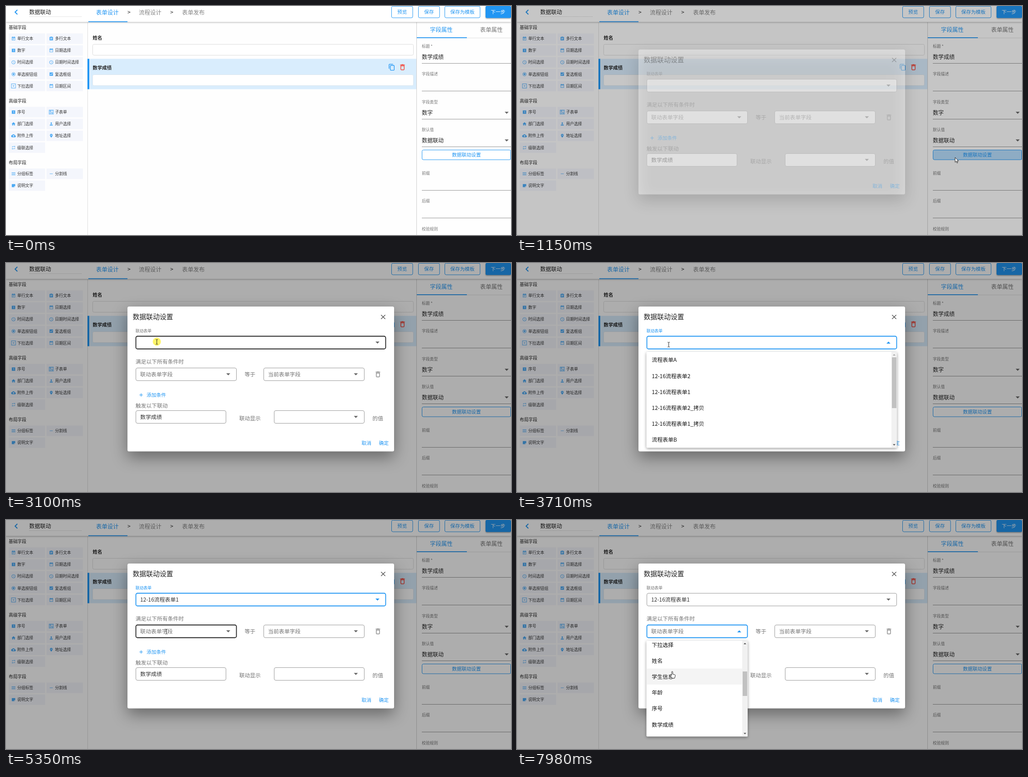
Recreate the animation shown at these times as an HTML page with a canvas. Size 1110 by 505 pixels, loop 8 s.

```html
<!DOCTYPE html>
<html lang="zh-CN">
<head>
<meta charset="utf-8">
<style>
html, body { margin: 0; width: 100%; height: 100%; overflow: hidden; background: #fff }
canvas { display: block }
</style>
</head>
<body>
<canvas id="stage" width="1110" height="505"></canvas>
<script>
const c = document.getElementById('stage').getContext('2d');
const BLUE = '#2196f3', GREY = '#757575', INK = '#222', FONT = '"Noto Sans CJK SC", "Noto Sans CJK", sans-serif';
const LOOP = 8000, ROW = 35.2;

const calendar = 'M3 3h18v18H3zM5 8h14v11H5zM6 1h2v2H6zM16 1h2v2h-2z';
const ring = 'M12 2a10 10 0 1 0 .01 0zM12 4a8 8 0 1 1-.01 0z';
const square = 'M3 3h18v18H3z';
const frame = 'M1 1h22v22H1zM3 3v18h18V3z';
const icons = {
  note: calendar + 'M7 10h10v2H7zM7 14h7v2H7z',
  date: calendar + 'M7 11h2v2H7zM11 11h2v2h-2zM15 11h2v2h-2z',
  lines: square + 'M9 1h6v2H9zM7 7h10v2H7zM7 11h10v2H7zM7 15h7v2H7z',
  one: square + 'M10 7h4v10h-2V9h-2z',
  clock: ring + 'M11 7h1.5v5l4 2.5-.8 1.2L11 13z',
  radio: ring + 'M12 7a5 5 0 1 0 .01 0z',
  check: square + 'M10 17l-5-5 1.4-1.4L10 14.2l7.6-7.6L19 8z',
  select: frame + 'M7 10h10l-5 5z',
  form: frame + 'M5 5h6v5H5zM13 6h6v2h-6zM5 13h8v2H5zM5 17h6v2H5zM14 13h5v6h-5z',
  home: 'M10 20v-6h4v6h5v-8h3L12 3 2 12h3v8z',
  user: 'M12 4a4 4 0 1 0 .01 0zM4 20v-2c0-5 16-5 16 0v2z',
  cloud: 'M6 20a6 6 0 0 1-.6-12 7.5 7.5 0 0 1 14 2A5 5 0 0 1 19 20zM14 17v-4h3l-5-5-5 5h3v4z',
  place: 'M12 22S5 14 5 9a7 7 0 0 1 14 0c0 5-7 13-7 13zM12 6.5a2.5 2.5 0 1 0 .01 0z',
  repeat: 'M7 7h10v3l4-4-4-4v3H5v6h2zM17 17H7v-3l-4 4 4 4v-3h12v-6h-2z',
  menu: 'M2 5h20v2H2zM2 11h20v2H2zM2 17h20v2H2z',
  minus: 'M4 11h16v2H4z',
  paper: 'M3 4h18v11l-5 5H3zM15 19v-5h5z',
  copy: 'M16 1H4L2 3v14h2V3h12zM8 5h11l2 2v14l-2 2H8l-2-2V7zM8 7v14h11V7z',
  bin: 'M6 7h12v12l-2 2H8l-2-2zM8 9v10h8V9zM15.5 4l-1-1h-5l-1 1H5v2h14V4z',
  close: 'M19 6.4L17.6 5 12 10.6 6.4 5 5 6.4l5.6 5.6L5 17.6 6.4 19l5.6-5.6 5.6 5.6 1.4-1.4-5.6-5.6z',
  plus: 'M11 5h2v6h6v2h-6v6h-2v-6H5v-2h6z'
};
for (const name in icons) icons[name] = new Path2D(icons[name]);
const arrowShape = new Path2D('M0 0v10.6l2.5-2.3 1.8 4 1.6-.8-1.8-3.7h3.4z');
const handShape = new Path2D('M3 8V1.2a1.2 1.2 0 0 1 2.4 0V6l4.2 1c1 .3 1.4.8 1.3 1.8l-.6 3.2-1 3H4.6L.6 10.2c-.5-.9.5-1.7 1.3-1.2z');

const clamp = v => Math.max(0, Math.min(1, v));
const ramp = (t, start, length) => clamp((t - start) / length);
const smooth = v => v * v * (3 - 2 * v);
const within = (v, a, b) => v >= a && v < b;

function text(s, x, y, size, color = INK, weight = 400, align = 'left') {
  c.font = `${weight} ${size}px ${FONT}`;
  c.textAlign = align;
  c.fillStyle = color;
  c.fillText(s, x, y + size * .37);
}
function fill(x, y, w, h, color) {
  c.fillStyle = color;
  c.fillRect(x, y, w, h);
}
function box(x, y, w, h, { color, border, width = 1, radius = 3 }) {
  c.beginPath();
  c.roundRect(x, y, w, h, radius);
  if (color) { c.fillStyle = color; c.fill(); }
  if (border) { c.strokeStyle = border; c.lineWidth = width; c.stroke(); }
}
function shadowed(blur, offset, alpha, draw) {
  c.save();
  c.shadowColor = `rgba(0,0,0,${alpha})`;
  c.shadowBlur = blur;
  c.shadowOffsetY = offset;
  draw();
  c.restore();
}
function icon(name, x, y, size, color) {
  c.save();
  c.translate(x - size / 2, y - size / 2);
  c.scale(size / 24, size / 24);
  c.fillStyle = color;
  c.fill(icons[name], 'evenodd');
  c.restore();
}
function caret(x, y, color = '#666', up = false, half = 4.4) {
  const d = up ? -half / 2 : half / 2;
  c.fillStyle = color;
  c.beginPath();
  c.moveTo(x - half, y - d);
  c.lineTo(x + half, y - d);
  c.lineTo(x, y + d);
  c.fill();
}
function ripple(x, y, w, h, cx, cy, radius, color) {
  c.save();
  c.beginPath();
  c.rect(x, y, w, h);
  c.clip();
  c.beginPath();
  c.arc(cx, cy, radius, 0, 7);
  c.fillStyle = color;
  c.fill();
  c.restore();
}

const palette = [
  ['基础字段', 47, 'note 单行文本,lines 多行文本,one 数字,date 日期选择,clock 时间选择,clock 日期时间选择,radio 单选按钮组,check 复选框组,select 下拉选择,date 日期区间'],
  ['高级字段', 209, 'one 序号,form 子表单,home 部门选择,user 用户选择,cloud 附件上传,place 地址选择,repeat 级联选择'],
  ['布局字段', 345, 'menu 分组标签,minus 分割线,paper 说明文字']
];
const properties = [
  ['标题 *', 89, '数学成绩'], ['字段描述', 150], ['字段类型', 212, '数字', 1], ['默认值', 273, '数据联动', 1],
  ['前缀', 369], ['后缀', 430], ['校验规则', 492]
];

function drawPage(t, pointer) {
  fill(0, 0, 1110, 505, '#fefefe');

  for (const [title, y, list] of palette) {
    text(title, 6, y, 9.7);
    list.split(',').forEach((entry, i) => {
      const [name, label] = entry.split(' ');
      const x = i % 2 * 83, cy = y + 25 + (i >> 1) * 26.1;
      fill(6 + x, cy - 11.5, 80, 23, '#f4f6fc');
      icon(name, 16.5 + x, cy, /select|form/.test(name) ? 11 : 10, '#4aa9f4');
      text(label, 24.7 + x, cy, 8.8, '#333');
    });
  }
  fill(179, 36, 1, 469, '#ddd');

  text('姓名', 190.5, 70, 10.4, INK, 700);
  box(190.5, 84.5, 705, 24, { color: '#fff', border: '#dcdcdc' });
  fill(179, 116.5, 723, 67, '#d9edfd');
  fill(179, 116.5, 4, 67, BLUE);
  text('数学成绩', 190.5, 136, 10.4, INK, 700);
  box(190.5, 151.5, 705, 24, { color: '#fff', border: '#dbe6ef' });
  icon('copy', 848, 135, 16, BLUE);
  icon('bin', 871.5, 135, 17.5, '#f44336');

  fill(902, 36, 1, 469, '#ccc');
  text('字段属性', 932, 52, 12.4, BLUE);
  text('表单属性', 1042, 52, 12.4, GREY);
  fill(903, 70, 207, 1, '#e0e0e0');
  fill(903, 69, 110, 1.8, BLUE);
  for (const [label, y, value, list] of properties) {
    text(label, 914, y, 8.8, GREY);
    if (value) text(value, 914, y + 23.5, 12);
    if (list) caret(1100.5, y + 23.5);
    fill(914, y + 37, 196, 1, '#949494');
  }
  const hover = t < 1250 && pointer.x > 914 && within(pointer.y, 317, 339);
  box(914.5, 317.5, 195, 21.5, { color: hover ? '#f1f8fe' : '#fff', border: BLUE });
  if (within(t, 945, 1500)) {
    const grow = 1 - (1 - ramp(t, 945, 225)) ** 2;
    ripple(915, 318, 195, 21, 963, 334, 148 * grow, `rgba(33,150,243,${.28 * (1 - ramp(t, 1200, 300))})`);
  }
  text('数据联动设置', 1012, 328, 10.6, BLUE, 400, 'center');

  shadowed(4, 1, .3, () => fill(0, -2, 1110, 37, '#fff'));
  c.strokeStyle = BLUE;
  c.lineWidth = 2;
  c.beginPath();
  c.moveTo(25, 8.5);
  c.lineTo(20, 13.5);
  c.lineTo(25, 18.5);
  c.stroke();
  text('数据联动', 51, 14, 12);
  for (let x = 51; x < 166; x += 2) fill(x, 23, 1, 1, '#ccc');
  text('表单设计', 198, 14, 12.4, BLUE);
  text('>', 267, 14, 12, INK);
  text('流程设计', 292, 14, 12.4, '#858585');
  text('>', 361, 14, 12, INK);
  text('表单发布', 387, 14, 12.4, '#858585');
  fill(181, 33.7, 86, 1.8, BLUE);
  for (const [label, x, w] of [['预览', 847.5, 46.5], ['保存', 906.5, 46.5], ['保存为模板', 964.5, 77.5]]) {
    box(x, .5, w, 25.5, { color: '#fff', border: BLUE });
    text(label, x + w / 2, 13.3, 10.7, BLUE, 400, 'center');
  }
  shadowed(3, 1.5, .35, () => box(1054, 0, 56, 26.5, { color: BLUE }));
  text('下一步', 1081.5, 13.3, 10.7, '#fff', 400, 'center');
}

function field(x, y, w, label, color, caretX, state = '', open = false) {
  const border = { focus: BLUE, hover: INK }[state] || '#999';
  box(x + .5, y + .5, w - 1, 28, { color: '#fff', border, width: state ? 1.8 : 1, radius: 3.5 });
  if (label) text(label, x + 10, y + 15, 11.9, color);
  if (caretX) caret(caretX, y + 14.5, state === 'focus' ? BLUE : '#666', open);
}

function drawDialog(s) {
  shadowed(34, 13, .4, () => box(267, 96, 586, 319.5, { color: '#fff', radius: 3.5 }));
  text('数据联动设置', 278.5, 119, 14.8);
  icon('close', 829, 119, 17.5, '#555');
  text('联动表单', 284.7, 150, 8.8, s.first === 'focus' ? BLUE : GREY);
  field(285, 161, 550, s.chosen && '12-16流程表单1', '#333', 816.5, s.first, s.open1);
  text('满足以下所有条件时', 284.7, 218, 11.8, GREY);
  field(285, 231, 222, '联动表单字段', GREY, 488.5, s.second, s.open2);
  text('等于', 524.5, 246, 11.8, GREY);
  field(566, 231, 222, '当前表单字段', GREY, 769);
  icon('bin', 817.5, 245.5, 17, '#888');
  icon('plus', 297, 291, 13, BLUE);
  text('添加条件', 309, 291, 10.7, BLUE);
  text('触发以下联动', 284.7, 315, 11.8, GREY);
  field(285, 325, 199, '数学成绩', '#333');
  text('联动显示', 512.7, 343, 11.8, GREY);
  field(589, 325, 199, '', GREY, 769);
  text('的值', 805.5, 343, 11.8, GREY);
  text('取消', 781.5, 397, 10.7, BLUE);
  text('确定', 819.7, 397, 10.7, BLUE);
}

const formNames = ['流程表单A', '12-16流程表单2', '12-16流程表单1', '12-16流程表单2_拷贝', '12-16流程表单1_拷贝', '流程表单B'];
const fieldNames = [1, 2, 3, 4, 5, 6, '', 7].map(n => '下拉选择' + n);
fieldNames.splice(7, 1, '姓名', '学生信息', '年龄', '序号', '数学成绩', '语文成绩');

function drawPanel({ y, w, items, scroll = 0, thumb, thumbY, alpha, pointer, hovering, press }) {
  if (alpha <= 0) return;
  const x = 284.5, h = 211.5, inner = w - 12, bar = x + w - 6;
  c.save();
  c.globalAlpha = alpha;
  shadowed(6, 2, .4, () => box(x, y, w, h, { color: '#fff', radius: 2 }));
  c.beginPath();
  c.rect(x, y, w, h);
  c.clip();
  items.forEach((label, i) => {
    const top = y + i * ROW - scroll;
    if (hovering && within(pointer.y, Math.max(y, top), top + ROW)) {
      fill(x, top, inner, ROW, '#f4f4f4');
      if (press) ripple(x, top, inner, ROW, pointer.x, pointer.y, press, 'rgba(0,0,0,.23)');
    }
    text(label, 296.3, top + ROW / 2 + .4, 11.9, '#111');
  });
  fill(x + inner, y, 12, h, '#f1f1f1');
  fill(bar - 5, thumbY, 10, thumb, '#c1c1c1');
  caret(bar, y + 6.5, scroll ? '#505050' : '#a3a3a3', true, 3);
  caret(bar, y + h - 6.5, '#505050', false, 3);
  c.restore();
}

const path = [
  [60, 1035, 512], [820, 963, 334], [1150, 963, 334], [1620, 376, 281], [1850, 376, 281], [2000, 376, 260],
  [2630, 346, 212], [2990, 332, 174], [3680, 332, 174], [3790, 344, 207], [3900, 344, 207], [4340, 370, 280],
  [4850, 370, 280], [5270, 353, 246], [6100, 353, 246], [6580, 378, 367], [7250, 378, 367], [7610, 345, 331],
  [7710, 345, 331], [7830, 343, 331], [7980, 341, 334], [LOOP, 341, 334]
];
function pointerAt(t) {
  const i = path.findIndex(p => p[0] > t);
  if (i < 1) return { x: -50, y: -50 };
  const [t0, x0, y0] = path[i - 1], [t1, x1, y1] = path[i];
  const k = smooth(ramp(t, t0, t1 - t0));
  return { x: x0 + (x1 - x0) * k, y: y0 + (y1 - y0) * k };
}

function drawPointer(t, { x, y }, hand) {
  const presses = [[940, 1030], [3030, 3180], [4490, 4600], [5400, 5500]];
  if (presses.some(([a, b]) => within(t, a, b))) {
    c.fillStyle = 'rgba(255,243,70,.8)';
    c.beginPath();
    c.arc(x - .5, y - .5, 9, 0, 7);
    c.fill();
  }
  c.save();
  c.strokeStyle = '#111';
  c.fillStyle = '#fff';
  c.lineWidth = .9;
  if (hand || t < 1560) {
    const shape = hand ? handShape : arrowShape;
    c.translate(x - (hand ? 4 : 0), y);
    c.fill(shape);
    c.stroke(shape);
  } else {
    c.translate(Math.round(x) - .5, Math.round(y));
    c.stroke(new Path2D('M0-5V5M-2.5-5.2h2M.5-5.2h2M-2.5 5.2h2M.5 5.2h2'));
  }
  c.restore();
}

function render() {
  const t = performance.now() % LOOP;
  const pointer = pointerAt(t);
  const hand = within(t, 3740, 4780) || t > 6190;
  drawPage(t, pointer);

  const shown = ramp(t, 1070, 200);
  if (shown > 0) {
    fill(0, 0, 1110, 505, `rgba(0,0,0,${.32 * smooth(Math.sqrt(shown))})`);
    const open1 = within(t, 3220, 4720), open2 = t >= 5480;
    const over = (top, start, focusFrom, focusTo) =>
      within(t, focusFrom, focusTo) ? 'focus'
        : t > start && !open1 && !open2 && within(pointer.y, top + .5, top + 28.5) ? 'hover' : '';
    c.globalAlpha = shown;
    drawDialog({
      open1, open2, chosen: t >= 4720,
      first: over(161, 2600, 3220, 5480),
      second: over(231, 1850, 5480, LOOP)
    });
    c.globalAlpha = 1;

    drawPanel({
      y: 196, w: 550.5, items: formNames, thumb: 112, thumbY: 208,
      alpha: ramp(t, 3220, 120) - ramp(t, 4720, 100),
      pointer, hovering: hand,
      press: t > 4500 && 465 * (1 - (1 - ramp(t, 4500, 400)) ** 2)
    });
    const scrolled = smooth(ramp(t, 6690, 280));
    drawPanel({
      y: 266, w: 222.5, items: fieldNames, scroll: 220 * scrolled, thumb: 54, thumbY: 278 + 56 * scrolled,
      alpha: ramp(t, 5480, 120), pointer, hovering: hand
    });
  }
  drawPointer(t, pointer, hand);
  requestAnimationFrame(render);
}
render();
</script>
</body>
</html>
```
